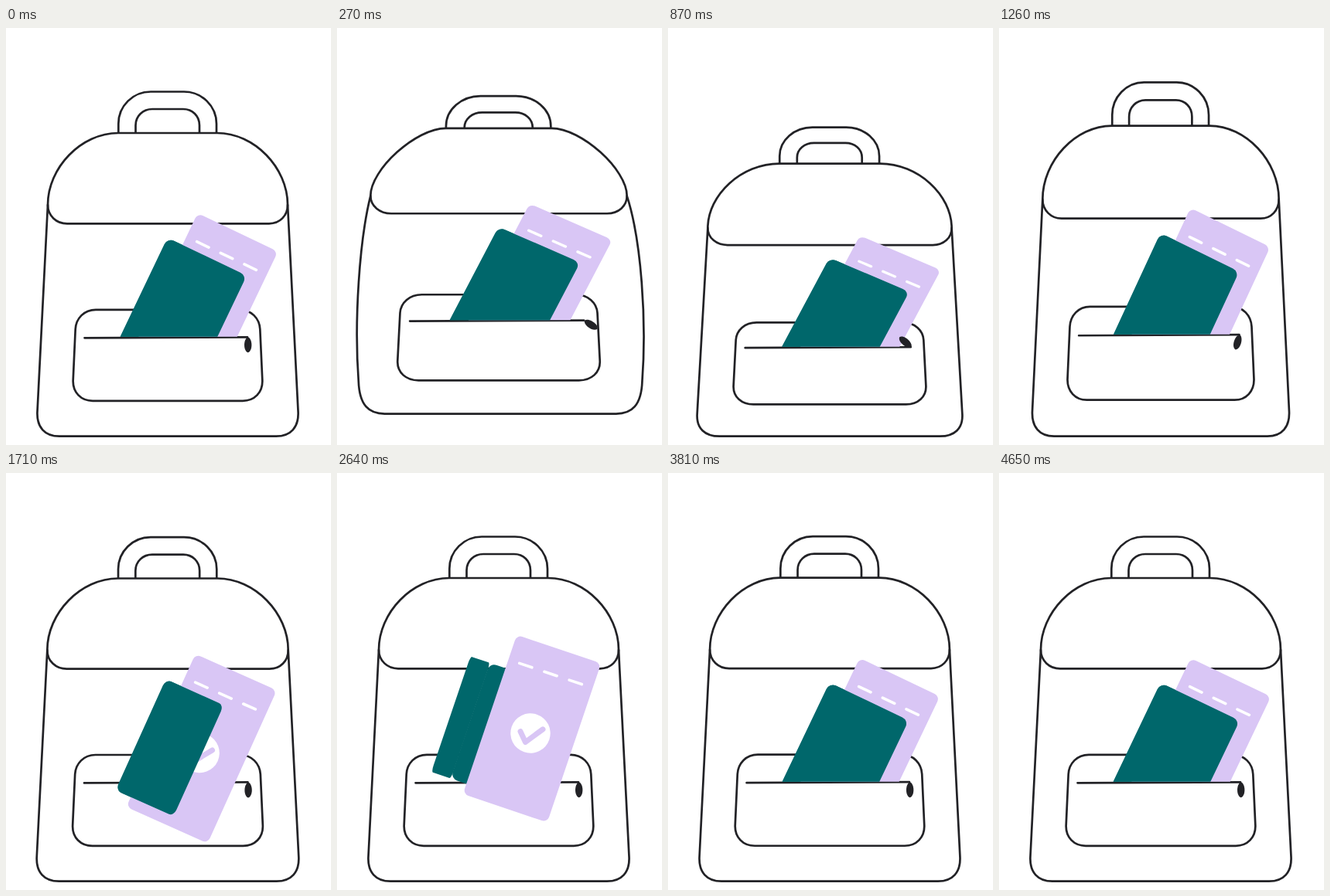
An HTML page that plays this animation: 420x540 px, repeating every 4680 ms.

```html
<!DOCTYPE html>
<html lang="en">
<head>
<meta charset="utf-8">
<title>Backpack</title>
<style>
  html, body { margin: 0; width: 100%; height: 100%; overflow: hidden; background: #fff; }
  svg { display: block; width: 420px; height: 540px; }
  .line { fill: none; stroke: #222226; stroke-width: 2.7; stroke-linecap: round; stroke-linejoin: round; }
  .line path { vector-effect: non-scaling-stroke; }
  .teal { fill: #00676b; }
  .lilac { fill: #d9c6f5; }
  .dash { stroke: #fff; stroke-width: 3.6; stroke-linecap: round; }
  .check { fill: none; stroke: #d9c6f5; stroke-width: 7; stroke-linecap: round; stroke-linejoin: round; }
</style>
</head>
<body>
<svg viewBox="0 0 420 540">
  <defs>
    <clipPath id="pocket"><rect y="-100" width="420" height="499.8"/></clipPath>
  </defs>
  <g id="bag">
    <g class="line">
      <g id="handle">
        <path d="M145.3 150V124C145.3 101 164 82.5 187 82.5H230C253 82.5 272 101 272 124V150"/>
        <path d="M167.5 150V126C167.5 114 177 105 189 105H229C241 105 250 114 250 126V150"/>
      </g>
      <path id="flap" fill="#fff"/>
      <path id="body"/>
      <path d="M116 364.8H302C317 364.8 327.5 376 328.3 390L331.3 456C332 472 321 482.8 306 482.8H112C97 482.8 86 472 86.700 456L89.7 390C90.5 376 101 364.8 116 364.8Z"/>
      <path d="M101.5 401.3L312 400.3"/>
    </g>
    <g id="clip">
      <g id="papers">
        <rect class="teal" x="-79" y="-69.5" width="113" height="158" rx="9"/>
        <rect class="lilac" x="-57.5" y="-115" width="115" height="217.5" rx="7.5"/>
        <path class="dash" d="M-42.5 -81.3h17M-8.5 -81.3h17M25.5 -81.3h17"/>
        <circle r="25.7" fill="#fff"/>
        <path class="check" d="M-13 2L-2.5 13L13.5 -10"/>
        <rect id="cover" class="teal" y="-69.5" width="113" height="158" rx="9"/>
      </g>
    </g>
    <path id="tab" fill="#222226" d="M0 0C6 2 6.5 18 0 20C-6.5 18 -6 2 0 0Z"/>
  </g>
</svg>
<script>
const LOOP = 4680, CX = 209, FLOOR = 528.7;
const OUT = 1560, IN = 3000; // papers leave and re-enter the pocket
const $ = id => document.getElementById(id);
const [bag, handle, flap, body, clip, papers, cover, tab] =
  ['bag', 'handle', 'flap', 'body', 'clip', 'papers', 'cover', 'tab'].map($);

const span = (t, a, b) => Math.min(1, Math.max(0, (t - a) / (b - a)));
const ease = (t, a, b) => { const u = span(t, a, b); return u * u * (3 - 2 * u); };
const spring = (t, start, period, decay) => {
  const s = Math.max(0, t - start);
  return Math.exp(-s / decay) * Math.sin(2 * Math.PI * s / period);
};
const hop = t => { const u = span(t, 165, 820) ** 1.2; return 4 * u * (1 - u); };

function swing(t, crouch) {
  const s = Math.max(0, t - 870);
  return -92 * crouch + 131 * ease(t, 600, 870) * Math.exp(-s / 190) * Math.cos(2 * Math.PI * s / 380);
}

// b: how far the sides bulge and the shoulders flatten
function flapPath(b) {
  const d = 4 + 12 * b;
  return `M54 229C54 ${177 + d} ${93 + d} 136 145 136H273C${325 - d} 136 364 ${177 + d} 364 229
    C364 243 354 253.3 340 253.3H79C65 253.3 54 243 54 229Z`;
}

function bodyPath(b) {
  const lean = CX + 2 * b;
  const half = side => `M${CX + side * 155} 229
    C${lean + side * (159.5 + 11 * b)} ${318 - 28 * b} ${lean + side * (164 + 13 * b)} ${407 - 7 * b}
    ${lean + side * (168.5 + 3 * b)} ${497 - 13 * b}
    C${lean + side * (169.5 + b)} 517 ${lean + side * 159} ${FLOOR} ${lean + side * 140} ${FLOOR}H${lean}`;
  return half(-1) + half(1);
}

function draw(t) {
  const wave = Math.sin(Math.PI * span(t, 0, 380)), crouch = wave * wave;
  const nudge = spring(t, IN - 20, 520, 250);
  const sx = 1 + .112 * crouch + .217 * spring(t, 862, 700, 220) + .028 * nudge;
  const sy = 1 - .095 * crouch - .22 * spring(t, 800, 640, 210) - .04 * nudge;
  const bulge = 1.27 * wave;
  const sink = 15 * crouch + 12 * spring(t, 860, 600, 200);
  const up = ease(t, OUT, 2100) - ease(t, 2640, IN);
  const open = Math.PI * (ease(t, OUT, 2030) - ease(t, 2430, 2900));
  const fit = (1 + (sx - 1) * .45) / sx; // papers stretch less than the bag

  const move = (el, value) => el.setAttribute('transform', value);
  move(bag, `translate(${CX} ${FLOOR - 73 * hop(t)}) scale(${sx} ${sy}) translate(${-CX} ${-FLOOR})`);
  move(handle, `translate(0 ${sink})`);
  move(tab, `translate(312.7 400.3) scale(${1 / sx} ${1 / sy}) rotate(${swing(t, crouch)})`);
  move(papers, `translate(${CX} 0) scale(${fit} 1) translate(${250 - CX} ${368.4 - 31.4 * up}) rotate(${25.5 - 6.84 * up})`);
  move(cover, `translate(-78.5 0) scale(${Math.cos(open)} 1)`);
  flap.setAttribute('d', flapPath(bulge));
  body.setAttribute('d', bodyPath(bulge));
  clip.setAttribute('clip-path', t > OUT && t < IN ? 'none' : 'url(#pocket)');
}

const start = performance.now();
function frame() {
  draw((performance.now() - start) % LOOP);
  requestAnimationFrame(frame);
}
frame();
</script>
</body>
</html>
```
